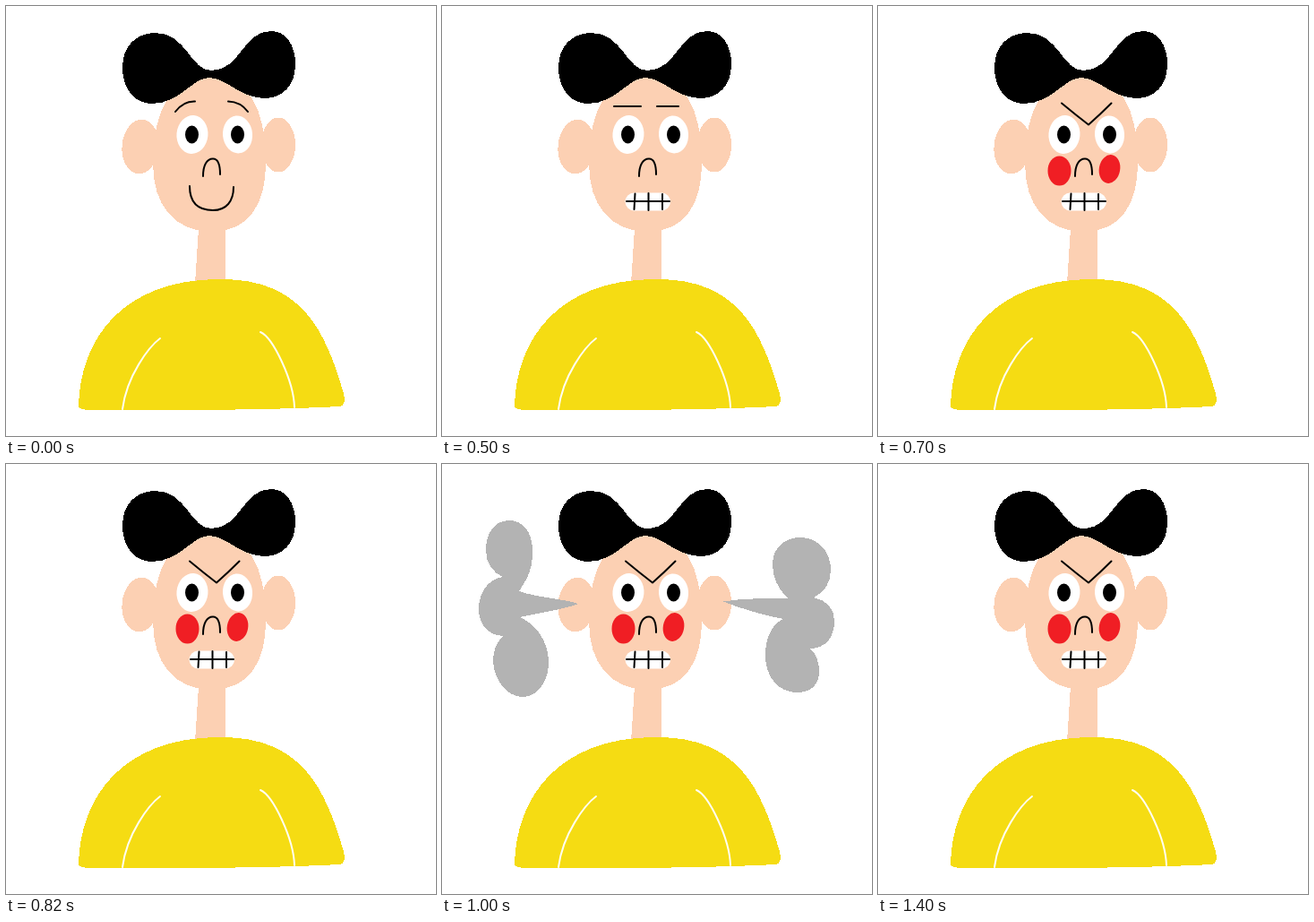
An HTML page for the animation above (1.6 s loop, 480 by 480 pixels).

```html
<!DOCTYPE html>
<html lang="en">
<head>
<meta charset="utf-8">
<title>Losing his temper</title>
<style>
  html, body { margin: 0; width: 100%; height: 100%; overflow: hidden; background: #fff; }
  svg { display: block; width: 100%; height: 100%; }
  .line { fill: none; stroke: #000; stroke-width: 2; stroke-linecap: round; stroke-linejoin: round; }
  .skin { fill: #fcd0b3; }
  .white { fill: #fff; }
  .smoke { fill: #b3b3b3; }
  .cheeks { fill: #f01e24; }
</style>
</head>
<body>
<svg viewBox="0 0 480 480">
  <g shape-rendering="crispEdges">
    <g class="skin">
      <path d="M215 248L211 310H245V248Z"/>
      <ellipse cx="150" cy="157" rx="20.5" ry="30.5" transform="rotate(5 150 157)"/>
      <ellipse cx="304" cy="155" rx="19" ry="30.5"/>
      <path d="M228 78C187 78 164 112 164 176C164 222 188 252 230 252C270 252 290 222 290 176C290 112 270 78 228 78Z"/>
    </g>
    <path fill="#f5dc13" d="M81 446C83 372 130 304.500 240 305C329 305 356 360 377 433Q380 446 372 447C300 451 170 452 88 450.500Q81 450 81 446Z"/>
  </g>
  <path shape-rendering="crispEdges" d="M130 69C130 45 145 30 167 30C201 30 206 72 229 72C262 72 264 28 296 28C313 28 323 44 323 65C323 88 309 103 289 103C262 103 245 80 227 80C208 80 194 109 163 109C143 109 130 92 130 69Z"/>
  <path class="line" style="stroke:#fffdf0" d="M172 371C160 380 135 412 130 450M284 364C298 370 321 418 322 448"/>

  <g class="white">
    <ellipse cx="208" cy="143.500" rx="17.500" ry="21.500" transform="rotate(5 208 143)"/>
    <ellipse cx="258.500" cy="143.500" rx="16.500" ry="21" transform="rotate(-5 258 143)"/>
  </g>
  <ellipse cx="207.500" cy="143.500" rx="7.500" ry="10"/>
  <ellipse cx="258.500" cy="143.500" rx="7.500" ry="10"/>
  <path class="line" d="M220 190C220 178 224 170.500 231 170.500C236 170.500 239 177 239 188"/>

  <g class="line" data-from="0" data-to="500">
    <path d="M189 118Q198 106 211 106.500M248 106.500Q262 107 270 118"/>
    <path d="M205 201C205 218 213 228 231 228C246 228 254 218 254 202"/>
  </g>
  <path class="line" data-from="500" data-to="600" d="M192 112H222M240 112H264"/>
  <path class="line" data-from="600" data-to="1600" d="M205 108.500Q220 121 235 132.500Q248 121 260.500 108.500"/>
  <g data-from="500" data-to="1600">
    <rect class="white" x="204.500" y="208.500" width="50.500" height="20" rx="10"/>
    <path class="line" d="M206 218H254M215.500 209.500L214.500 227M230.500 209V228M246 210V227"/>
  </g>
  <g class="cheeks" data-from="600" data-to="700">
    <ellipse cx="202.500" cy="184" rx="9" ry="11.500"/>
    <ellipse cx="258.500" cy="182" rx="8.500" ry="11.500" transform="rotate(10 258.5 182)"/>
  </g>
  <g class="cheeks" data-from="700" data-to="1600">
    <ellipse cx="202.500" cy="184" rx="13" ry="16.500"/>
    <ellipse cx="258.500" cy="182" rx="11.700" ry="16" transform="rotate(10 258.5 182)"/>
  </g>
  <g class="smoke" data-from="900" data-to="1100" shape-rendering="crispEdges">
    <path id="left" d="M152 156C140 151 105 149 86 142C92 132 101 122 101 98C101 75 90 63 75 63C58 63 49 78 49 96C49 112 58 122 68 126C50 129 41 145 41 162C41 180 52 191 68 192C60 200 57 210 57 220C58 243 74 260 90 260C107 260 119 242 119 222C119 200 107 180 87 171C108 166 138 162 152 156Z"/>
    <path id="right" d="M314 153.500C335 150 360 150 386 150C375 139 369 127 369 112C369 94 382 82 400 82C420 82 434 98 434 118C434 133 427 143 415 149C430 152 438 162 438 175C438 194 428 206 410 206C418 211 421 221 421 232C421 247 411 255 396 255C376 255 361 238 361 214C361 194 368 179 381 173C360 169 335 162 314 153.500Z"/>
  </g>
</svg>
<script>
  const LOOP = 1600, GROW = 1000;
  const timed = document.querySelectorAll('[data-from]');
  const [left, right] = ['left', 'right'].map(id => document.getElementById(id));
  const start = performance.now();

  function draw(now) {
    const t = Math.max(0, now - start) % LOOP;
    for (const el of timed) {
      el.style.display = t >= +el.dataset.from && t < +el.dataset.to ? '' : 'none';
    }
    const small = t < GROW;
    left.setAttribute('transform', small ? 'translate(61.8 70.4) scale(.565)' : '');
    right.setAttribute('transform', small ? 'translate(105.3 55.8) scale(.636)' : '');
    requestAnimationFrame(draw);
  }
  draw(start);
</script>
</body>
</html>
```
